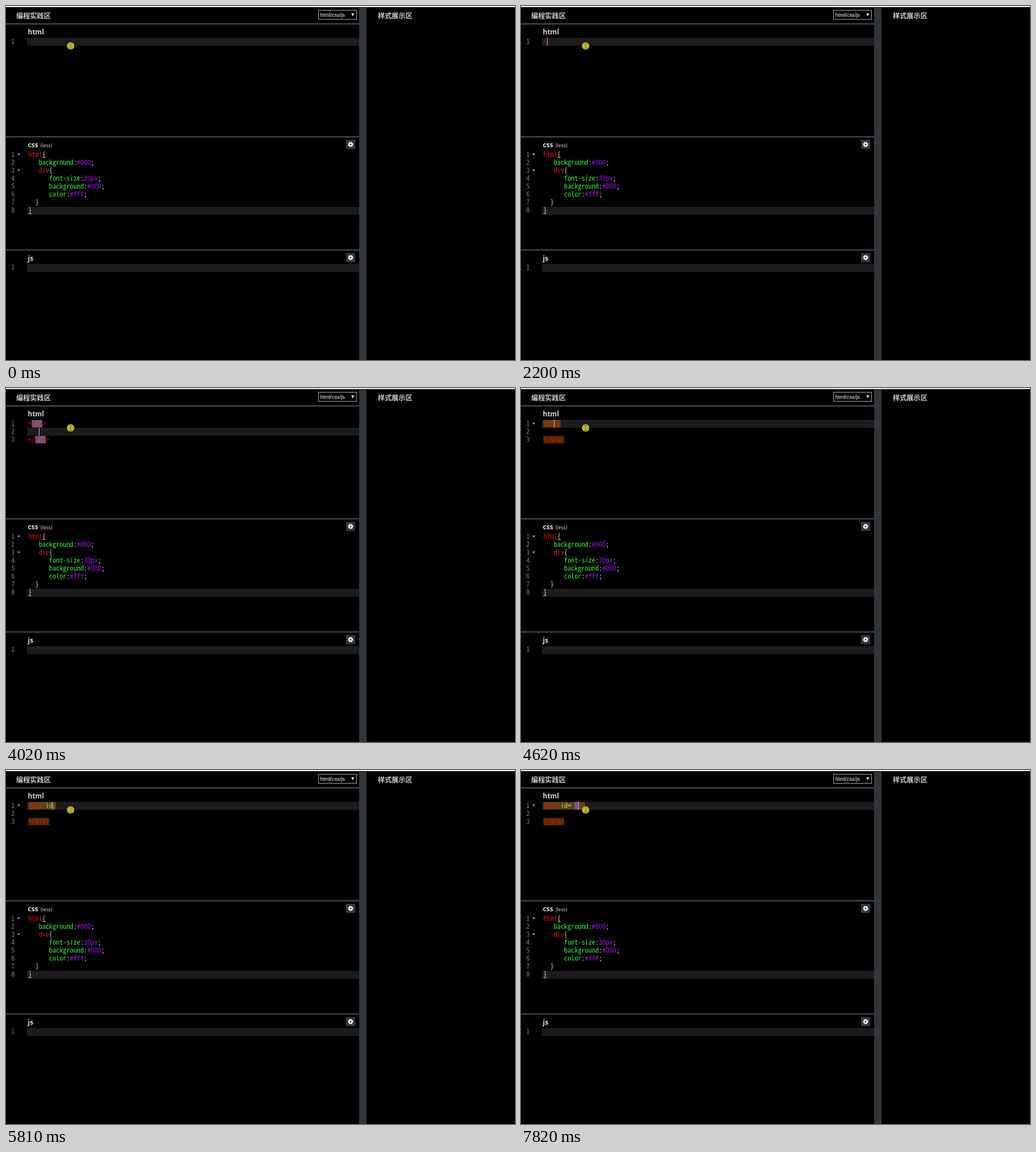
An HTML page that plays this animation: 898x624 px, repeating every 8 s.

```html
<!DOCTYPE html>
<html lang="zh">
<head>
<meta charset="utf-8">
<title>Code playground</title>
<style>
  html, body { margin: 0; width: 100%; height: 100%; overflow: hidden; background: #000; }
  svg { display: block; width: 898px; height: 624px; }
  text { white-space: pre; }
  .code text { font-family: "Noto Sans Mono CJK SC", "Liberation Mono", monospace; }
  .title { font: bold 12.2px "Noto Sans CJK SC", "Noto Sans CJK", sans-serif; fill: #c9ccd2; }
  .head { font: bold 12px "Open Sans", "Noto Sans", sans-serif; fill: #dcdcdc; }
  .note { font: 8.7px "Open Sans", "Noto Sans", sans-serif; fill: #dcdcdc; }
  .menu { font: 9.33px "Liberation Sans", Arial, sans-serif; fill: #fff; }
</style>
</head>
<body>
<svg viewBox="0 0 898 624">
  <rect width="898" height="624"/>
  <rect width="898" height="2" fill="#eef2f2"/>
  <g fill="#363b3e">
    <rect y="30" width="623" height="3"/>
    <rect y="229" width="623" height="3"/>
    <rect y="428.5" width="623" height="3"/>
    <rect x="623" y="3" width="13" height="621" fill="#31363a"/>
  </g>
  <text class="title" x="18" y="22">编程实践区</text>
  <text class="title" x="656" y="22">样式展示区</text>
  <rect x="551.5" y="7.5" width="67" height="16" stroke="#a9a9a9"/>
  <text class="menu" x="554.5" y="19">html/css/js</text>
  <path d="M609.2 13h5l-2.5 5z" fill="#fff"/>
  <text class="head" x="38.5" y="50">html</text>
  <text class="head" x="38.5" y="249.4">css</text>
  <text class="note" x="61" y="249.4">(less)</text>
  <text class="head" x="38.5" y="449">js</text>
  <g id="gears"></g>
  <g class="code" id="still"></g>
  <g class="code" id="live"></g>
  <g id="pointer">
    <circle cx="114" cy="70.3" r="6.5" fill="#bdb62c"/>
    <path d="M112 65.5h1.5l.7.6.7-.6h1.5M114.2 66v8.5M112 75h1.5l.7-.6.7.6h1.5" fill="none" stroke="#77733a" stroke-width=".9"/>
  </g>
</svg>
<script>
const LOOP = 8000, LEFT = 39.4, CHAR = 6.12, ROW = 14.1;
const TOPS = { html: 56, css: 255.1, js: 454.8 };
const RED = '#ea0c0c', GREEN = '#30f830', PURPLE = '#b010f8', PLAIN = '#dedede', ATTR = '#8fe42e';
const WORD = '#6a6486', TAG = 'rgba(255,150,0,.3)', ACTIVE = '#1c1c1e';

// Font size that gives the editor's character advance
const probe = document.createElement('canvas').getContext('2d');
probe.font = '100px "Noto Sans Mono CJK SC", "Liberation Mono", monospace';
const SIZE = CHAR * 100 / probe.measureText('m').width;

const colX = col => LEFT + col * CHAR;
const rowY = (pane, row) => TOPS[pane] + row * ROW;
const box = (x, y, w, h, fill) => `<rect x="${x}" y="${y}" width="${w}" height="${h}" fill="${fill}"/>`;
const escape = s => s.replace(/&/g, '&amp;').replace(/</g, '&lt;');
const textAt = (x, y, s, fill) =>
  `<text x="${x}" y="${y + 10.6}" font-size="${SIZE}" fill="${fill}">${escape(s)}</text>`;
const lineNumber = (pane, row) => textAt(9.2, rowY(pane, row), String(row + 1), '#7c7c7c');
const foldMark = (pane, row) => `<path d="M20.2 ${rowY(pane, row) + 4.9}h4.6l-2.3 3.4z" fill="#b4b4b4"/>`;
const activeLine = (pane, row) => box(37, Math.round(rowY(pane, row)), 586, 14, ACTIVE);
const cells = (pane, row, col, n, fill) =>
  box(colX(col), Math.round(rowY(pane, row)) + .5, n * CHAR, 13, fill);

// Draws a line as coloured tokens: [text, colour] pairs starting at a column
function tokens(pane, row, col, list) {
  return list.map(([s, fill]) => {
    const out = textAt(colX(col), rowY(pane, row), s, fill);
    col += s.length;
    return out;
  }).join('');
}

const rule = (name, value) => [[name, GREEN], [':', PLAIN], [value, PURPLE], [';', PLAIN]];
const cssLines = [
  [0, [['html', RED], ['{', PLAIN]]],
  [3, rule('background', '#000')],
  [3, [['div', RED], ['{', PLAIN]]],
  [6, rule('font-size', '30px')],
  [6, rule('background', '#000')],
  [6, rule('color', '#fff')],
  [2, [['}', PLAIN]]],
  [0, [['}', PLAIN]]]
];

function drawStill() {
  const underline = (row, col) => box(colX(col), Math.round(rowY('css', row)) + 11.5, CHAR, 1, '#b0b0b0');
  const lines = cssLines.map(([col, list], row) => lineNumber('css', row) + tokens('css', row, col, list));
  still.innerHTML = activeLine('css', 7) + activeLine('js', 0) + lines.join('') + lineNumber('js', 0) +
    foldMark('css', 0) + foldMark('css', 2) + underline(0, 4) + underline(7, 0);
  gears.innerHTML = [236, 435.5].map(y => box(600, y, 16, 16, '#37393b') +
    `<g fill="none" stroke="#fff" transform="translate(608 ${y + 8})">
      <circle r="2.6" stroke-width="2"/>
      <circle r="3.9" stroke-width="1.5" stroke-dasharray="1.63 1.433"/></g>`).join('');
}

function markup(source) {
  const colour = s => /^[<>']/.test(s) ? RED : /^[= ]/.test(s) ? PLAIN : ATTR;
  let quoted = false;
  return (source.match(/<\/?\w+|\w+|./g) || []).map(s => {
    if (s === "'") quoted = !quoted;
    return [s, quoted && s !== "'" ? PURPLE : colour(s)];
  });
}

// Each step changes only the listed parts of the editor state:
// code = first line, caret = [row, column], words = highlighted [row, column, length]
const pair = [[0, 1, 3], [2, 2, 3]];
const steps = [
  [0, { code: '', caret: null, line: 0, words: [], block: false, fold: false, match: false }],
  [390, { caret: [0, 0] }],
  [990, { caret: null }],
  [1620, { caret: [0, 0] }],
  [2010, { caret: null }],
  [2200, { code: '<', caret: [0, 1] }],
  [2620, { code: '<div', caret: [0, 4] }],
  [2800, { words: [[0, 1, 3]] }],
  [3610, { caret: null }],
  [4020, { code: '<div>', block: true, line: 1, caret: [1, 3], words: pair }],
  [4220, { words: [] }],
  [4420, { fold: true }],
  [4610, { line: 0, caret: [0, 3], match: true }],
  [4820, { words: pair }],
  [5010, { caret: [0, 4] }],
  [5220, { code: '<div >', caret: [0, 5] }],
  [5420, { words: [] }],
  [5810, { code: '<div id>', caret: [0, 7] }],
  [6010, { words: [[0, 5, 2]] }],
  [6210, { code: '<div id=>', caret: [0, 8], words: [] }],
  [6620, { caret: null }],
  [7020, { caret: [0, 8] }],
  [7250, { code: "<div id=''>", caret: [0, 9] }],
  [7640, { code: "<div id='a'>", caret: [0, 10] }],
  [7820, { words: [[0, 9, 1]] }]
];
let state = {};
const states = steps.map(([, change]) => state = { ...state, ...change });

function drawLive({ code, caret, line, words, block, fold, match }) {
  let out = activeLine('html', line);
  if (match) out += cells('html', 0, 0, code.length, TAG) + cells('html', 2, 0, 6, TAG);
  out += words.map(([row, col, n]) => cells('html', row, col, n, WORD)).join('');
  out += lineNumber('html', 0) + tokens('html', 0, 0, markup(code));
  if (block) out += lineNumber('html', 1) + lineNumber('html', 2) + tokens('html', 2, 0, markup('</div>'));
  if (fold) out += foldMark('html', 0);
  if (caret) out += box(Math.round(colX(caret[1])), Math.round(rowY('html', caret[0])), 1, 14, '#bcbcbc');
  live.innerHTML = out;
}

const still = document.getElementById('still');
const live = document.getElementById('live');
const gears = document.getElementById('gears');
const start = performance.now();
let shown = -1;

function tick() {
  const time = (performance.now() - start) % LOOP;
  const index = steps.filter(([at]) => at <= time).length - 1;
  if (index !== shown) drawLive(states[shown = index]);
  requestAnimationFrame(tick);
}

drawStill();
tick();
</script>
</body>
</html>
```
